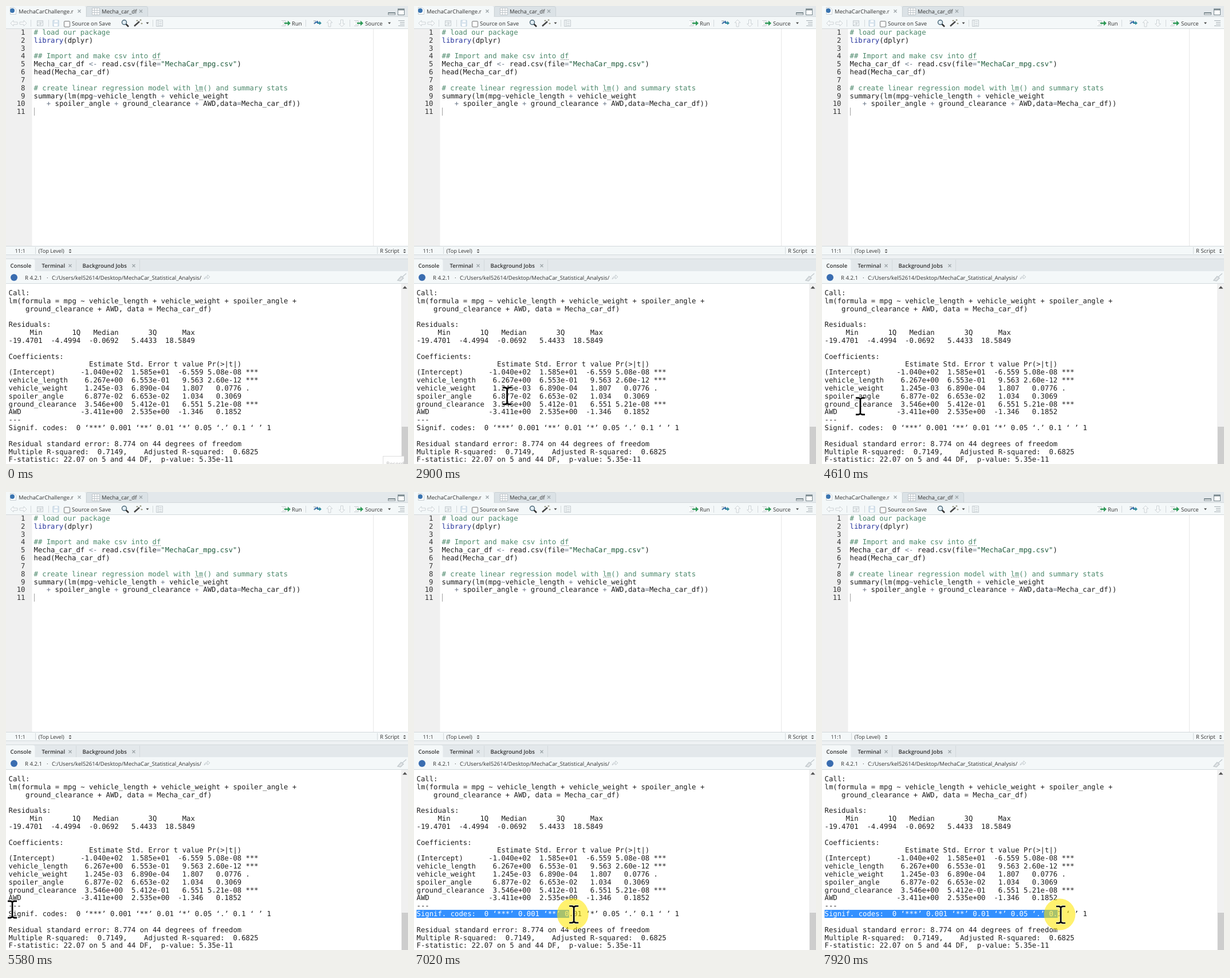
An HTML page that plays this animation: 702 px wide and 798 px high, repeating every 7990 ms.

```html
<!DOCTYPE html>
<html lang="en">
<head>
<meta charset="utf-8">
<title>Regression console</title>
<style>
  html, body { margin: 0; width: 100%; height: 100%; overflow: hidden; background: #fff; }
  svg { display: block; }
  text { white-space: pre; text-rendering: geometricPrecision; }
  .mono { font: 12.29px "DejaVu Sans Mono", monospace; fill: #1c1c1c; }
  .ui { font: 9.6px "Open Sans", sans-serif; fill: #333; }
  .bold { font-weight: 600; }
  .num { fill: #333; text-anchor: end; }
  .comment { fill: #4c886b; }
  .string { fill: #1f5a3c; }
  .keyword { fill: #26349c; }
  .op { fill: #687687; }
  .line { fill: none; stroke: #d3d9dc; }
  .pale { fill: none; stroke: #c3cace; }
  .squiggle { fill: none; stroke: #8a9a92; stroke-dasharray: 2 1; }
  #picked text { fill: #fff; }
</style>
</head>
<body>
<svg width="702" height="798" viewBox="0 0 702 798">
  <defs>
    <path id="close" d="M-2.5-2.5 2.5 2.5M2.5-2.5-2.5 2.5" stroke="#9aa2a6" stroke-width="1.2"/>
    <g id="panes" fill="none" stroke="#78878d">
      <rect x="-5.500" y="1.500" width="12" height="3.500" fill="#fff"/>
      <path d="M-5.500 2H6.500" stroke-width="2"/>
      <rect x="11.500" y="-4.500" width="11" height="10" fill="#fff"/>
      <path d="M11 -4H23" stroke-width="3"/>
    </g>
    <path id="sort" d="M-2.500-1 0-3.500 2.500-1zM-2.500 1 0 3.500 2.500 1z" fill="#555"/>
    <path id="drop" d="M-2.500-1.500H2.500L0 1.500z" fill="#444"/>
    <path id="hollow" d="M-6 0-1-5V-2H6V2H-1V5z" fill="#f8fafb" stroke="#ccd2d5"/>
    <g id="run">
      <path d="M0-4.500H7V4.500H0M1.500-2H5M1.500 2H5" fill="#fff" stroke="#c0c8cc"/>
      <path d="M5-1.300H11V-4.500L16 0 11 4.500V1.300H5z" fill="#2f9a58"/>
    </g>
    <path id="beam" d="M-8-14H-3L0-12.500 3-14H8M0-12.500V13.500M-8 15H-3L0 13.500 3 15H8"/>
    <clipPath id="tipClip"><rect x="658" y="784" width="37" height="14"/></clipPath>
    <clipPath id="selClip"><rect class="sel" x="4.5" y="728" width="0" height="14"/></clipPath>
  </defs>

  <rect width="702" height="798" fill="#fff"/>

  <!-- editor chrome -->
  <rect width="702" height="19" fill="#e3e8eb"/>
  <path d="M140.500 19V3Q140.500 .5 143 .5H244Q247.500 .5 247.500 4V19z" fill="#dbe2e6" stroke="#cbd2d6"/>
  <rect y="18" width="702" height="21" fill="#f4f8f9"/>
  <path d="M0 19V0H136Q139.500 0 139.500 4V19z" fill="#f4f8f9"/>
  <path class="line" d="M139.500 18.500H702M0 39.500H702"/>
  <path d="M7.500 2.500H14L17.500 6V14.500H7.500z" fill="#fff" stroke="#c5ccd0"/>
  <circle cx="11" cy="8" r="4" fill="#3a74b0"/>
  <path d="M150.500 3.500H163.500V15.500H150.500zM150.500 7.500H163.500M150.500 11.500H163.500M154.500 3.500V15.500M159 3.500V15.500" fill="#fff" stroke="#bcc4c8"/>
  <use href="#close" x="128" y="9"/>
  <use href="#close" x="235.500" y="9"/>
  <use href="#panes" x="673" y="10"/>
  <use href="#panes" x="673" y="453"/>
  <use href="#hollow" x="14" y="30"/>
  <use href="#hollow" transform="translate(30 30) scale(-1 1)"/>
  <use href="#hollow" transform="translate(565 30) rotate(90)"/>
  <use href="#hollow" transform="translate(586.500 30) rotate(-90)"/>
  <path class="line" d="M43.500 24V36M74.500 24V36M256.500 24V36M523.500 24V36M600.500 24V36"/>
  <path class="pale" d="M54.500 25.500H64.500V34.500H54.500zM54.500 28H64.500M54 35Q57 30 61 31M59 29 62 31 59 33"/>
  <path d="M82 25H92V35H82z" fill="#dce7f0" stroke="#b9cddd"/>
  <path d="M85 25H90V28H85zM84 31H90V35H84z" fill="#fff"/>
  <rect x="101.500" y="26.500" width="10" height="10" rx="1.500" fill="#fff" stroke="#777"/>
  <path d="M209 31 214 36" stroke="#333" stroke-width="2.500"/>
  <circle cx="206.500" cy="28.500" r="4" fill="#e4eff6" stroke="#4b6878" stroke-width="1.500"/>
  <path d="M224 35 233 27" stroke="#444" stroke-width="2.500"/>
  <path d="M229 24V27M227.500 25.500H230.500M235 23V26M233.500 24.500H236.500M237 29V32M235.500 30.500H238.500" stroke="#8b8b73"/>
  <use href="#drop" x="247" y="30"/>
  <path class="pale" d="M262.500 24.500H273.500V35.500H262.500zM265.500 24.500V35.500M267 27.500H272M267 30.500H272M267 33.500H272"/>
  <use href="#run" x="481" y="30"/>
  <path d="M537 26H542M537 30H541" stroke="#8b979d"/>
  <path d="M538 32Q538 27 543 27V25L546 28 543 31V29Q540 29 538 32z" fill="#3268a8"/>
  <path d="M544 28.500H547V26L551 30 547 33V31H544z" fill="#2f8a9a"/>
  <use href="#run" x="608" y="30"/>
  <use href="#drop" x="669.500" y="30"/>
  <path d="M685 25.500H696M688 28.500H696M688 31.500H696M685 34.500H696" stroke="#a6afb4"/>

  <!-- editor body -->
  <rect y="40" width="45.500" height="378" fill="#f0f0f0"/>
  <path d="M641.500 40V418" stroke="#e8e8e8"/>
  <path d="M49.500 177V191" stroke="#a0a0a0"/>
  <g id="code"></g>
  <path class="squiggle" d="M256 93.500H271M330 148.500H345"/>
  <rect y="418" width="702" height="16" fill="#f4f8f9"/>
  <path class="line" d="M0 418.500H702M0 433.500H702M51.500 420V432M648.500 420V432"/>
  <use href="#sort" x="112" y="427"/>
  <use href="#sort" x="696" y="427"/>

  <!-- console chrome -->
  <rect y="434" width="702" height="7" fill="#eef1f3"/>
  <rect y="441" width="702" height="22" fill="#e3e8eb"/>
  <path class="line" d="M0 440.500H702M122.500 442V462M233.500 442V462M50 462.500H702"/>
  <rect y="462" width="702" height="21" fill="#f4f8f9"/>
  <path d="M0 463V441H47Q50.500 441 50.500 445V463z" fill="#f4f8f9"/>
  <path class="line" d="M0 483.500H702"/>
  <use href="#close" x="112" y="452.500"/>
  <use href="#close" x="223" y="452.500"/>
  <circle cx="14" cy="473" r="6" fill="#3a6db0"/>
  <path class="pale" d="M346 476Q347 471 352 471V468.500L356 472 352 475.500V473Q349 473 346 476z"/>
  <path d="M699 466 691 473M684 478 690 471 694 474 689 479z" fill="#e3e6e8" stroke="#c3cace" stroke-width="1.500"/>

  <g id="labels"></g>

  <!-- console body -->
  <g id="output"></g>
  <rect x="690" y="484" width="12" height="314" fill="#f0f0f0"/>
  <path d="M692.500 492.500 696.500 488 700.500 492.500z" fill="#505050"/>
  <rect x="691" y="733" width="11" height="65" fill="#cdcdcd"/>

  <rect class="sel" x="4.500" y="728" width="0" height="14" fill="#3390ff"/>
  <g id="picked" clip-path="url(#selClip)"></g>

  <g id="tip" clip-path="url(#tipClip)">
    <rect x="658.500" y="784.500" width="44" height="20" fill="#fff" fill-opacity=".9" stroke="#dedede"/>
    <text class="ui" x="664" y="801" style="fill:#b5b5b5">Record</text>
  </g>

  <g id="pointer" visibility="hidden">
    <circle id="halo" cx="-2" r="27.500" fill="#ffe600" fill-opacity=".57"/>
    <g fill="none" stroke-linejoin="round">
      <use href="#beam" stroke="#fff" stroke-opacity=".8" stroke-width="4.500"/>
      <use href="#beam" stroke="#000" stroke-width="2.700"/>
    </g>
  </g>
</svg>

<script>
const LOOP = 7990, CHAR = 7.4, ROW = 13.83, LEFT = 4.5;
const $ = id => document.getElementById(id);
const esc = s => s.replace(/&/g, '&amp;').replace(/</g, '&lt;');
const label = (x, y, body, cls = 'mono', size = '') =>
  `<text x="${x}" y="${y}" class="${cls}"${size && ` style="font-size:${size}px"`}>${body}</text>`;

const code = `# load our package
library(dplyr)

## Import and make csv into df
Mecha_car_df <- read.csv(file="MechaCar_mpg.csv")
head(Mecha_car_df)

# create linear regression model with lm() and summary stats
summary(lm(mpg~vehicle_length + vehicle_weight
   + spoiler_angle + ground_clearance + AWD,data=Mecha_car_df))
`.split('\n');

const output = `Call:
lm(formula = mpg ~ vehicle_length + vehicle_weight + spoiler_angle + 
    ground_clearance + AWD, data = Mecha_car_df)

Residuals:
     Min       1Q   Median       3Q      Max 
-19.4701  -4.4994  -0.0692   5.4433  18.5849 

Coefficients:
                   Estimate Std. Error t value Pr(>|t|)    
(Intercept)      -1.040e+02  1.585e+01  -6.559 5.08e-08 ***
vehicle_length    6.267e+00  6.553e-01   9.563 2.60e-12 ***
vehicle_weight    1.245e-03  6.890e-04   1.807   0.0776 .  
spoiler_angle     6.877e-02  6.653e-02   1.034   0.3069    
ground_clearance  3.546e+00  5.412e-01   6.551 5.21e-08 ***
AWD              -3.411e+00  2.535e+00  -1.346   0.1852    
---
Signif. codes:  0 ‘***’ 0.001 ‘**’ 0.01 ‘*’ 0.05 ‘.’ 0.1 ‘ ’ 1

Residual standard error: 8.774 on 44 degrees of freedom
Multiple R-squared:  0.7149,    Adjusted R-squared:  0.6825 
F-statistic: 22.07 on 5 and 44 DF,  p-value: 5.35e-11`.split('\n');
const CODES_ROW = 17;

// x, baseline, text, class, size
const labels = [
  [22, 12.5, 'MechaCarChallenge.r', 'ui'],
  [167, 12.5, 'Mecha_car_df', 'ui'],
  [115, 33.5, 'Source on Save', 'ui'],
  [499, 33.5, 'Run', 'ui'],
  [627, 33.5, 'Source', 'ui'],
  [15.5, 430, '11:1', 'ui', 9.2],
  [56.5, 430, '(Top Level)', 'ui', 9.2],
  [653, 430, 'R Script', 'ui'],
  [7.5, 455.5, 'Console', 'ui bold'],
  [62.5, 455.5, 'Terminal', 'ui bold'],
  [133.5, 455.5, 'Background Jobs', 'ui bold'],
  [33, 477, 'R 4.2.1', 'ui'],
  [71, 477, '·', 'ui'],
  [80, 477, 'C:/Users/kel52614/Desktop/MechaCar_Statistical_Analysis/', 'ui'],
];

const kinds = ['comment', 'string', 'keyword', 'op'];
const paint = line => esc(line).replace(/(#.*)|(".*?")|(\blibrary\b)|(&lt;-|[+~=])/g,
  (m, ...groups) => `<tspan class="${kinds[groups.findIndex(g => g === m)]}">${m}</tspan>`);
const outLine = (line, i) => label(LEFT, 504 + i * ROW, esc(line));

$('code').innerHTML = code.map((line, i) => {
  const y = 50 + i * ROW;
  return label(33.5, y, i + 1, 'mono num') + label(48.5, y, paint(line));
}).join('');
$('labels').innerHTML = labels.map(l => label(...l)).join('');
$('output').innerHTML = output.map(outLine).join('');
$('picked').innerHTML = outLine(output[CODES_ROW], CODES_ROW);

// Pointer visits: each is a list of [ms, x, y]
const peek = [[1050, 670, 806], [1120, 684, 799], [1190, 684, 799]];
const tour = [
  [1920, 685, 800], [1990, 640, 790], [2060, 560, 775], [2130, 470, 757], [2200, 393, 744],
  [2270, 334, 736], [2340, 300, 728], [2410, 283, 720], [2550, 270, 708], [2680, 267, 703],
  [2750, 250, 698], [2820, 205, 687], [2900, 163, 679], [2970, 135, 676], [3100, 112, 680],
  [3300, 99, 690], [3530, 95, 696], [3800, 82, 706], [4200, 71, 718], [4400, 71, 716],
  [4610, 67, 697], [4800, 58, 675], [5000, 48, 657], [5160, 43, 651], [5230, 41, 656],
  [5350, 28, 690], [5500, 14, 722], [5720, 6, 735], [5980, 8, 736], [6100, 18, 736],
  [6200, 55, 737], [6310, 104, 737], [6380, 123.5, 737], [6740, 233, 736], [7020, 279, 735.5],
  [7300, 325, 736], [7580, 376, 735.5], [7920, 417, 736], [LOOP, 417, 736],
];
const PRESS = 5980, LAG = 65;

function at(path, t) {
  const i = path.findIndex(p => p[0] > t);
  if (i < 1) return null;
  const [a, b] = [path[i - 1], path[i]];
  const k = (t - a[0]) / (b[0] - a[0]);
  return [a[1] + (b[1] - a[1]) * k, a[2] + (b[2] - a[2]) * k];
}

const bars = document.querySelectorAll('.sel');
const show = (el, on) => el.setAttribute('visibility', on ? 'visible' : 'hidden');

function draw(t) {
  const pos = at(peek, t) || at(tour, t);
  const held = t >= PRESS;
  show($('tip'), t < 70);
  show($('pointer'), pos);
  show($('halo'), pos && held);
  if (pos) $('pointer').setAttribute('transform', `translate(${pos})`);
  const chars = held ? Math.max(0, Math.round((at(tour, t - LAG)[0] - LEFT) / CHAR)) : 0;
  bars.forEach(bar => bar.setAttribute('width', chars * CHAR));
}

const start = performance.now();
function tick() {
  draw((performance.now() - start) % LOOP);
  requestAnimationFrame(tick);
}
tick();
</script>
</body>
</html>
```
